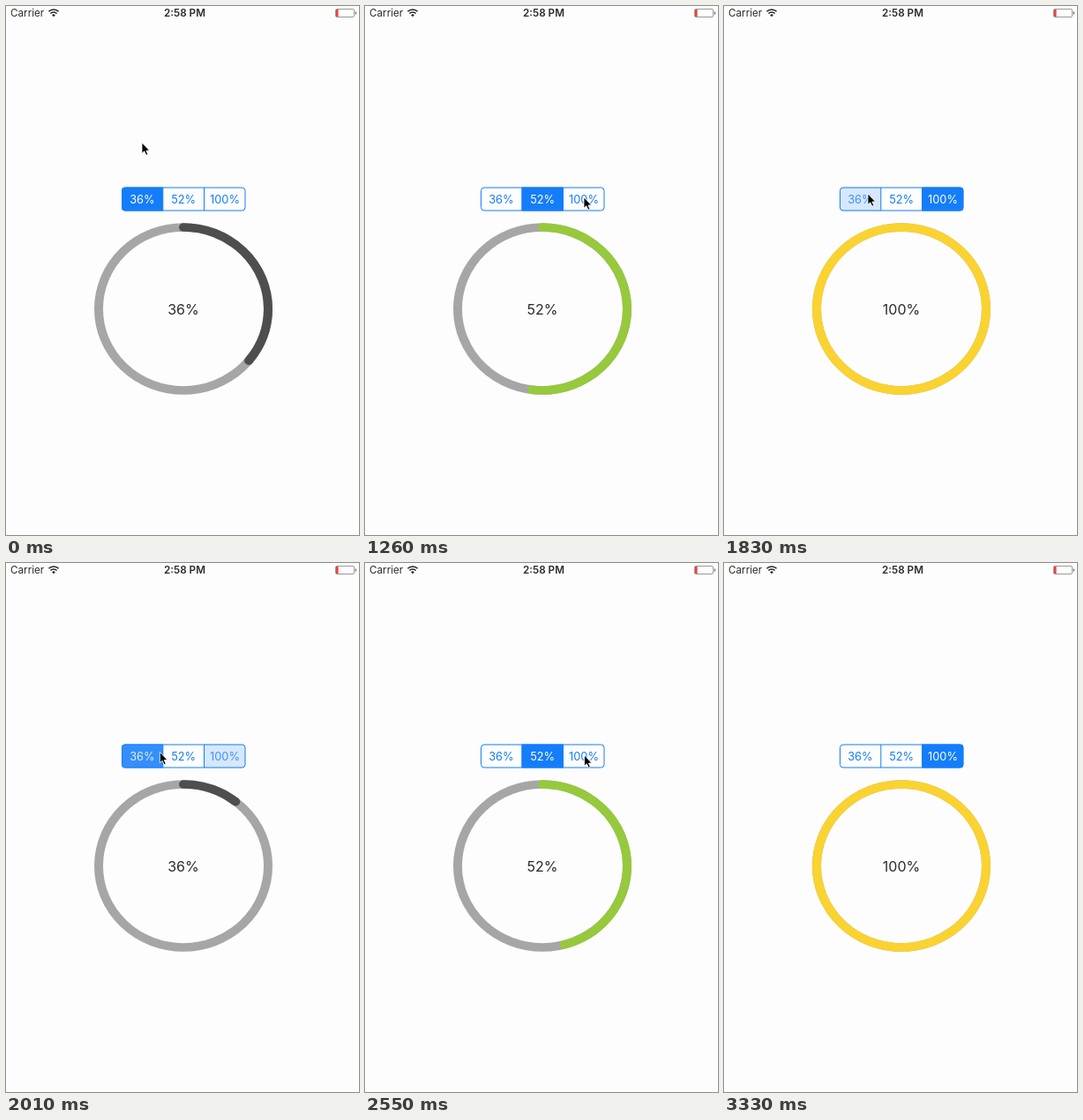
An HTML page that plays this animation: 400x600 px, repeating every 3.36 s.

```html
<!DOCTYPE html>
<html lang="en">
<head>
<meta charset="utf-8">
<title>Progress ring</title>
<style>
  html, body { margin: 0; width: 100%; height: 100%; overflow: hidden; background: #fdfdfd; }
  svg { display: block; }
  text { font-family: Inter, Roboto, sans-serif; text-anchor: middle; fill: #2c2c2c; }
  .status { font-size: 11.7px; }
  .segment text { font-size: 12.8px; }
</style>
</head>
<body>
<svg width="400" height="600" viewBox="0 0 400 600" fill="none">
  <text class="status" x="5" y="12.2" style="text-anchor:start">Carrier</text>
  <g stroke="#222" stroke-width="1.6">
    <path d="M48.4 6.3a8 8 0 0 1 11.2 0M50.4 8.5a5.1 5.1 0 0 1 7.2 0"/>
    <path d="M54 12.2l-1.9-2a2.7 2.7 0 0 1 3.8 0z" fill="#222" stroke="none"/>
  </g>
  <text class="status" x="202.5" y="12.2" font-weight="600">2:58 PM</text>
  <rect x="373.5" y="3.5" width="21" height="9" rx="1.5" stroke="#999"/>
  <rect x="374" y="4" width="2.6" height="8" fill="#ee4438"/>
  <path d="M396.3 6.5v3" stroke="#444"/>

  <clipPath id="pill"><rect x="131" y="205.5" width="140.5" height="27" rx="4"/></clipPath>
  <g id="segments" clip-path="url(#pill)"></g>
  <path d="M177.8 206v26M224.5 206v26" stroke="#147dfa"/>
  <rect x="131.5" y="206" width="139.5" height="26" rx="3.5" stroke="#147dfa"/>

  <g transform="translate(201 343.5) scale(1 .963) rotate(-90)" stroke-width="10">
    <circle r="96" stroke="#a6a6a6"/>
    <circle id="arc" r="96" pathLength="1" stroke-linecap="round"/>
  </g>
  <text id="label" x="201" y="349.5" font-size="16"></text>
  <path id="cursor" d="M0 0V12.2L2.8 9.7 4.8 14.2 6.8 13.3 4.9 9H8.6Z" fill="#000" stroke="#fff" stroke-width=".8"/>
</svg>
<script>
const LOOP = 3360, FADE = 200, DELAY = 20, SWEEP = 400, TINT = 100, PRESS = 60, PRESSED = .17;
const BLUE = [20, 125, 250], WHITE = [255, 255, 255];
const options = [
  { value: 36, color: [78, 78, 78], x: 131, width: 46.8 },
  { value: 52, color: [150, 201, 60], x: 177.8, width: 46.7 },
  { value: 100, color: [250, 211, 48], x: 224.5, width: 47 }
];
// [release time, option]
const taps = [[-1000, 0], [705, 1], [1340, 2], [1845, 0], [2220, 1], [2612, 2]];
// [time, x, y] of the pointer tip
const route = [
  [60, 154, 155], [600, 204.5, 217], [900, 204.5, 217], [1200, 248, 217],
  [1450, 248, 217], [1760, 163, 213], [1930, 163, 213], [2150, 201, 218],
  [2330, 201, 218], [2540, 248.5, 218], [2850, 248.5, 218], [3240, 248.5, -20]
];

const byId = id => document.getElementById(id);
const clamp = v => Math.min(1, Math.max(0, v));
const mix = (a, b, k) => a + (b - a) * k;
const ease = k => (1 - Math.cos(Math.PI * clamp(k))) / 2;
const blend = (a, b, k) => `rgb(${a.map((v, i) => Math.round(mix(v, b[i], k)))})`;

byId('segments').innerHTML = options.map(o => `<g class="segment">
  <rect x="${o.x}" y="205" width="${o.width}" height="28" fill="#147dfa"/>
  <text x="${o.x + o.width / 2}" y="223.7">${o.value}%</text></g>`).join('');
const segments = [...document.querySelectorAll('.segment')];

function pointerAt(t) {
  const next = route.findIndex(p => p[0] > t);
  if (next < 0) return route[route.length - 1].slice(1);
  const b = route[next], a = route[Math.max(0, next - 1)];
  const k = next ? ease((t - a[0]) / (b[0] - a[0])) : 0;
  return [mix(a[1], b[1], k), mix(a[2], b[2], k)];
}

function render(t) {
  const n = taps.filter(tap => tap[0] <= t).length - 1;
  const [start, current] = taps[n];
  const previous = n ? taps[n - 1][1] : current;
  const upcoming = taps[n + 1];
  const elapsed = t - start, fade = clamp(elapsed / FADE);

  segments.forEach((segment, i) => {
    let level = 0;
    if (i === current) level = mix(PRESSED, 1, fade);
    else if (i === previous) level = 1 - fade;
    if (upcoming && i === upcoming[1] && t >= upcoming[0] - PRESS) level = Math.max(level, PRESSED);
    const [box, text] = segment.children;
    box.style.opacity = level;
    text.style.fill = blend(BLUE, WHITE, level);
  });

  const { value, color } = options[current];
  const sweep = ease((elapsed - DELAY) / SWEEP) * value / 100;
  const tint = clamp((elapsed - DELAY) / TINT);
  byId('arc').setAttribute('stroke-dasharray', `${sweep} 2`);
  byId('arc').setAttribute('stroke', blend(options[previous].color, color, tint));
  byId('label').textContent = value + '%';
  byId('cursor').setAttribute('transform', `translate(${pointerAt(t)})`);
}

function tick() {
  render(performance.now() % LOOP);
  requestAnimationFrame(tick);
}
tick();
</script>
</body>
</html>
```
